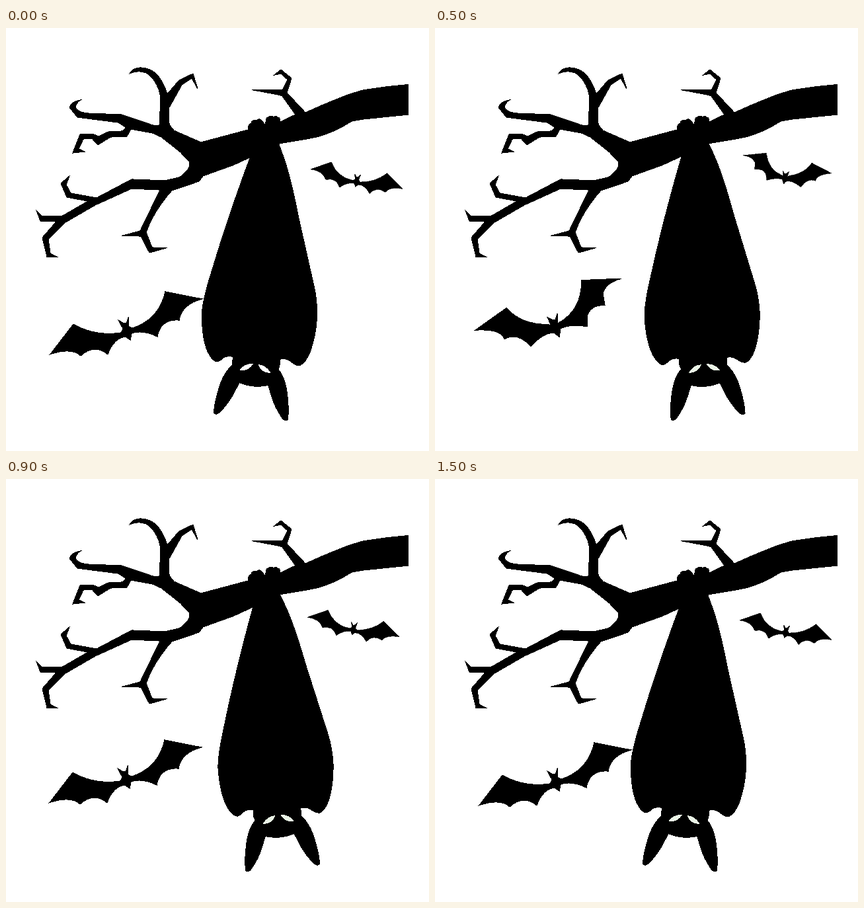
Write an HTML page that moves like this. It is 640 px wide and 640 px high and loops after 1550 ms.

```html
<!DOCTYPE html>
<html lang="en">
<head>
<meta charset="utf-8">
<title>Hanging bat</title>
<style>
  html, body { margin: 0; height: 100%; overflow: hidden; background: #fff; }
  svg { display: block; width: 100vw; height: 100vh; shape-rendering: crispEdges; }
  path { stroke: #000; stroke-width: 1.2; stroke-miterlimit: 8; }
  #eyes { stroke: none; }
</style>
</head>
<body>
<svg viewBox="0 0 640 640">
  <!-- branch -->
  <path d="M608.5 85.5L575 89L540 94L517 101L480 116L453 128
    L425 98L432 76L416 63L406 71L416 69L426 78L418 94L372 93.5L412 101L418 103L438 131
    L413 143L370 153L295 173L254 155L247 146L246 122L266 86L281 76L290 92L283 69L262 79L244 100
    C238 82 228 60 203 60Q191 61 187 69Q200 63 212 68C227 76 234 98 234 108L232 148L222 147
    L175 131L122 129Q108 127 105 120Q106 113 113 109Q99 111 96 120L108 135L170 143L182 151
    L176 156L155 157L140 164L133 161L112 161L101 189L119 187L110 183L117 168L130 167L139 177
    L158 165L183 164L189 153L222 159L235 165L264 188L278 203Q279 215 262 226L240 231L190 229
    L137 257L98 250L91 237L96 224L83 235L92 256L124 262L84 285L55 285L46 276L52 292L76 293
    L55 317L62 346L77 346L67 341L64 320L90 294L135 268L190 243L233 245L203 307L177 314L204 315
    L217 340L242 333L221 332L212 309Q224 276 251 246L292 232L298 224L345 207L371 195L413 175
    L460 167Q490 162 523 141L540 138L608.5 131Z"/>
  <!-- feet -->
  <path d="M367 165V149Q367 146 371 144Q373 138 379 140Q383 136 387 140Q390 142 391 148
    L393 143Q393 134 399 134Q403 132 405 135Q408 131 411 135Q416 136 414 142L412 165Z"/>
  <g id="body">
    <path d="M380 155L374 188Q343 285 322 370Q310 415 310 435Q311 472 321 493Q329 508 336 508
      Q341 507 345 502Q353 497 361 500V512H431V500Q440 497 447 502Q455 508 460 508
      Q469 506 476 487Q484 462 484 432Q483 408 478 390L449 285Q434 224 422 195Q417 182 412 172L408 155Z"/>
    <g id="head">
      <path d="M361 495V514Q349 526 344 551Q339 575 340 588Q343 592 348 587Q361 572 368 554L374 539
        Q396 546 418 539L424 554Q431 572 444 587Q449 592 452 588Q453 575 448 551Q443 526 431 514V495Z"/>
      <path id="eyes" d="M392 509Q380 509 372 520Q386 522 392 509ZM400 509Q412 509 420 520Q406 522 400 509Z"/>
    </g>
  </g>
  <path class="flyer"/>
  <path class="flyer"/>
</svg>
<script>
const TICK = 50, LOOP = 1550, SWING = 1500;

const wingsDown = `M67 493.5L102 448Q135 467 174 461L177 455L170 442L178 447L182 447L185 438L186 452L192 454
  Q232 440 241 399L297 410Q266 418 262 442Q234 440 229 467Q206 456 190 462L188 472L181 467
  Q163 469 154 494Q134 477 113 496Q100 483 67 493.5Z`;
const wingsUp = `M61 461.5L108 428Q130 453 172 453L176 455L170 442L178 446L182 446L185 437L186 451
  Q222 432 222 386L282 383.5Q258 390 254 406L257 424Q236 423 230 440V456Q205 452 190 459L188 472
  L181 466Q165 464 145 486Q125 464 105 475Q100 459 61 461.5Z`;

// time, body angle, head angle, left flyer x y, right flyer x y
const keys = [
  [0, 2.8, 5.3, 0, 0, 0, 0],
  [200, 1.6, 2.1, -2, 0, -5.5, -1],
  [350, 0, -2.1, -1.5, -3.5, -3, -3.5],
  [650, -2.6, -6.3, 1, -4.5, -0.5, -5],
  [900, -2.3, -5.2, -1, -4, -5, -4.5],
  [1250, 1.6, 3.2, 0.5, -1, -1, -2],
];

function key(i) {
  const n = keys.length, [time, ...values] = keys[(i + n) % n];
  return { time: time + Math.floor(i / n) * SWING, values };
}

// Smooth cyclic curve through the keys
function pose(t) {
  let i = keys.length - 1;
  while (keys[i][0] > t) i--;
  const [a, b, c, d] = [i - 1, i, i + 1, i + 2].map(key);
  const span = c.time - b.time, u = (t - b.time) / span;
  return b.values.map((from, k) => {
    const to = c.values[k];
    const m0 = (to - a.values[k]) / (c.time - a.time) * span;
    const m1 = (d.values[k] - from) / (d.time - b.time) * span;
    const e = u * u * (3 - 2 * u);
    return from + (to - from) * e + m0 * u * (1 - u) ** 2 - m1 * u * u * (1 - u);
  });
}

const byId = id => document.getElementById(id);
const body = byId("body"), head = byId("head"), eyes = byId("eyes");
const [left, right] = document.querySelectorAll(".flyer");
const place = (el, transform) => el.setAttribute("transform", transform);

function draw(now) {
  const tick = Math.floor(now % LOOP / TICK);
  const [tilt, nod, lx, ly, rx, ry] = pose(tick * TICK % SWING);
  place(body, `rotate(${tilt} 395 160)`);
  place(head, `rotate(${nod - tilt} 395.5 480)`);
  eyes.setAttribute("fill", tick ? "#eaf5e6" : "#fff");
  const wings = tick % 3 ? wingsUp : wingsDown;
  left.setAttribute("d", wings);
  right.setAttribute("d", wings);
  place(left, `translate(${lx} ${ly})`);
  place(right, `translate(${531 + rx} ${231.5 + ry}) rotate(-8) scale(-.582 .582) translate(-182 -457)`);
}

let start;
function frame(now) {
  start ??= now;
  draw(now - start);
  requestAnimationFrame(frame);
}
draw(0);
requestAnimationFrame(frame);
</script>
</body>
</html>
```
